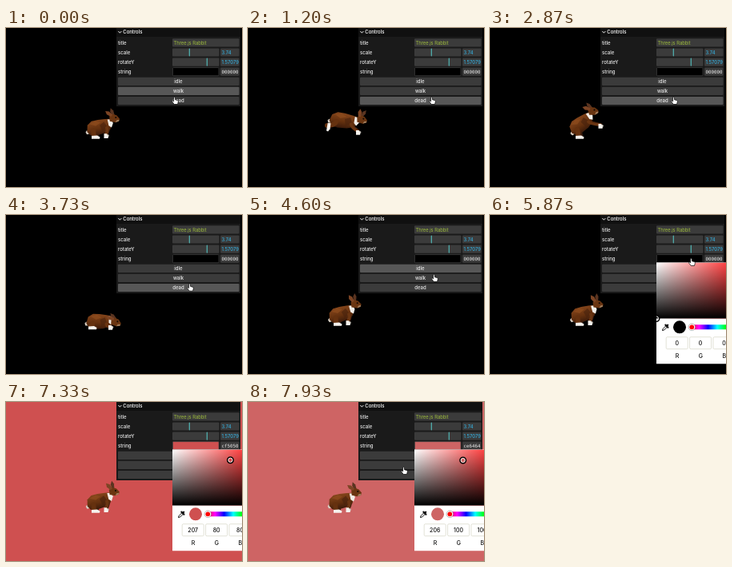
Recreate the animation shown at these times as an HTML page. Size 295 by 199 pixels, loop 8000 ms.

```html
<!DOCTYPE html>
<html lang="en">
<head>
<meta charset="utf-8">
<title>Rabbit controls</title>
<style>
  html, body { margin: 0; width: 100%; height: 100%; overflow: hidden; background: #000; }
  svg { display: block; width: 100%; height: 100%; }
  text { font: 500 6px Inter, "Liberation Sans", sans-serif; fill: #ebebeb; }
  .title { font-weight: 600; font-size: 5.9px; }
  .mid { text-anchor: middle; }
  .mono { font: 5.8px "DejaVu Sans Mono", monospace; }
  .string { fill: #9fbd3e; font-size: 5.8px; font-weight: 400; }
  .number { fill: #35addb; font-size: 5.8px; }
  .widget { fill: #3b3b3b; }
  .widget.hover { fill: #575757; }
  .picker text { fill: #111; font-size: 7px; text-anchor: middle; }
  .field { fill: #fff; stroke: #d6d6c6; stroke-width: .7; }
  .leg { fill: none; stroke-linecap: round; }
</style>
</head>
<body>
<svg viewBox="0 0 295 199" preserveAspectRatio="none">
  <defs>
    <linearGradient id="saturation"><stop stop-color="#fff"/><stop offset="1" stop-color="#f00"/></linearGradient>
    <linearGradient id="shade" x2="0" y2="1"><stop stop-opacity="0"/><stop offset="1"/></linearGradient>
    <linearGradient id="hue"></linearGradient>
    <linearGradient id="fur" x2="0" y2="1"><stop stop-color="#84451b"/><stop offset=".55" stop-color="#65310f"/><stop offset="1" stop-color="#3a1a0a"/></linearGradient>
    <clipPath id="numberClip"><rect x="268" width="23.2" height="60"/></clipPath>
    <clipPath id="pickerClip"><rect x="208" y="59.5" width="118" height="126.7"/></clipPath>
  </defs>

  <rect id="scene" width="295" height="199"/>

  <g id="rabbit">
    <path id="hindFar" class="leg" stroke="#3a1b0b" stroke-width="4"/>
    <path id="frontFar" class="leg" stroke="#3a1b0b" stroke-width="3"/>
    <ellipse id="pawFar" rx="2.3" ry="1.8" fill="#c9c4bc"/>
    <g id="body">
      <path d="M-15 1 L-17 3 L-16 6 L-13 6Z" fill="#d8cfc4"/>
      <path d="M-15 3 L-13 -5 L-7 -9 L1 -9 L10 -8 L16 -7 L18 -2 L14 6 L6 9 L-5 10 L-12 8Z" fill="url(#fur)"/>
      <path d="M-10 -6 L-2 -8 L4 -5 L-3 -2Z" fill="#935020" opacity=".6"/>
      <path d="M2 -2 L8 -5 L11 2 L4 6Z" fill="#4a230e" opacity=".65"/>
      <path d="M13 -7 L18 -6 L19 -1 L16 4 L13 1Z" fill="#f2eee8"/>
    </g>
    <path id="hind" class="leg" stroke="#65310f" stroke-width="6"/>
    <path id="hindFoot" d="M-5 -1.6 L2 -2 L5.5 0 L5 2.2 L-5 2.2Z" fill="#f5f2ed"/>
    <path id="front" class="leg" stroke="#6a3512" stroke-width="3.8"/>
    <path id="paw" d="M-2 -3 L1.6 -3 L3.4 1 L3 2.8 L-2 2.8Z" fill="#f5f2ed"/>
    <g id="head">
      <path id="earFar" d="M-1.4 0 L-2.2 -6 L0 -10 L2 -6 L1.4 0Z" fill="#5a3420"/>
      <path d="M-6 -2 L-2 -5 L3 -4 L7 0 L6.5 3 L2 5 L-5 4Z" fill="#6a3511"/>
      <path d="M3.5 2 L6.7 1.3 L6.3 3.2 L2 5Z" fill="#a07d5c"/>
      <circle cx="2.2" cy="-1.2" r="1" fill="#100906"/>
      <path id="ear" d="M-1.6 0 L-2.5 -6 L0 -10 L2.3 -6 L1.6 0Z" fill="#7c4424"/>
    </g>
  </g>

  <g id="panel">
    <rect x="138" width="155" height="98" fill="#1a1a1a"/>
    <rect x="138" width="155" height="11" fill="#101010"/>
    <path d="M140.4 4 l2 2.2 2-2.2" fill="none" stroke="#ebebeb" stroke-width="1"/>
    <text class="title" x="146.3" y="7.2">Controls</text>
  </g>

  <g class="picker" id="picker" clip-path="url(#pickerClip)">
    <rect x="208" y="59" width="118" height="128" fill="#fff"/>
    <rect x="208" y="59.5" width="118" height="70" fill="url(#saturation)"/>
    <rect x="208" y="59.5" width="118" height="70" fill="url(#shade)"/>
    <g id="ring" fill="none"><circle r="3.7" stroke="#000" stroke-width="1.6"/><circle r="2.6" stroke="#fff" stroke-width=".9"/></g>
    <path d="M215.5 144.5 l.6-2 4-4 1.5 1.5 -4 4Z" fill="none" stroke="#111" stroke-width="1"/>
    <path d="M219.4 137.6 l3 3 M220.9 139 l1.3-1.3" stroke="#111" stroke-width="2.2" stroke-linecap="round"/>
    <circle id="chip" cx="237" cy="140.3" r="8"/>
    <rect x="250" y="137.3" width="68" height="6" rx="3" fill="url(#hue)"/>
    <circle cx="252.3" cy="140.3" r="3.5" fill="#f00" stroke="#fff" stroke-width="1.2"/>
    <circle cx="252.3" cy="140.3" r="4.3" fill="none" stroke="#777" stroke-width=".5"/>
  </g>

  <path id="cursor" d="M-1.5 -4.3 q.9-.9 1.7 0 l.3 3 3 .9 q1 .5.8 1.8 l-.8 3.1h-4.2 l-2.7-3.4 q-.2-1.2 1-1 l1 .8Z" fill="#fff" stroke="#000" stroke-width=".7"/>
</svg>

<script>
const LOOP = 8000, STEP = 1000 / 15, ROW = 12.1, STRIDE = 800;
const el = id => document.getElementById(id);
const set = (id, name, value) => el(id).setAttribute(name, value);

function add(parent, tag, attrs, text = '') {
  const node = document.createElementNS('http://www.w3.org/2000/svg', tag);
  for (const name in attrs) node.setAttribute(name, attrs[name]);
  node.textContent = text;
  return el(parent).appendChild(node);
}

const rowTop = i => 13.3 + i * ROW;
const widget = (row, x, width, attrs) =>
  add('panel', 'rect', { class: 'widget', x, y: rowTop(row), width, height: 10.2, rx: 1, ...attrs });
const label = (row, x, text, attrs) => add('panel', 'text', { x, y: rowTop(row) + 7.2, ...attrs }, text);

['title', 'scale', 'rotateY', 'string'].forEach((name, i) => label(i, 140, name));
widget(0, 208, 83.5);
label(0, 209.5, 'Three.js Rabbit', { class: 'string' });
[['3.74', 229.3], ['1.57079', 251.3]].forEach(([value, x], i) => {
  widget(i + 1, 208, 58.5);
  widget(i + 1, 268, 23.5);
  widget(i + 1, x - .6, 1.2, { style: 'fill: #52b5b4' });
  label(i + 1, 269.5, value, { class: 'number', 'clip-path': 'url(#numberClip)' });
});
widget(3, 208.4, 57.7, { id: 'swatch', class: '', stroke: '#3f3f3f', 'stroke-width': .8 });
widget(3, 268, 23.5);
label(3, 269.5, '', { id: 'hex', class: 'mono' });
const buttons = ['idle', 'walk', 'dead'].map((name, i) => {
  const button = widget(i + 4, 140, 151.5);
  label(i + 4, 215.5, name, { class: 'mid' });
  return button;
});
const channels = [...'RGB'].map((name, i) => {
  const x = 233.7 + i * 29.4;
  add('picker', 'rect', { class: 'field', x: x - 13.5, y: 152.7, width: 27, height: 15, rx: 1.5 });
  add('picker', 'text', { x: x + .3, y: 178.6 }, name);
  return add('picker', 'text', { x, y: 162.7 });
});
for (let i = 0; i <= 6; i++) {
  add('hue', 'stop', { offset: i / 6, 'stop-color': `hsl(${360 - i * 60} 100% 50%)` });
}

function ramp(t, from, to) {
  const u = Math.min(1, Math.max(0, (t - from) / (to - from)));
  return u * u * (3 - 2 * u);
}

function mix(a, b, amount) {
  return Object.fromEntries(Object.keys(a).map(k => [k, a[k] + ((b[k] ?? a[k]) - a[k]) * amount]));
}

const sit = {
  x: 115.5, y: 124, lean: -16, stretch: 1,
  headX: 134.5, headY: 111.5, nod: 0, ears: -34,
  frontX: 124.5, frontY: 135.3, hindX: 112, hindY: 136.5, kick: 0,
};
const nibble = { lean: -12, headX: 135, headY: 113, nod: 4, ears: -58 };
const rear = { x: 113, y: 120.5, lean: -34, headX: 128.5, headY: 104, nod: -8, ears: -68, frontX: 137.5, frontY: 123 };
const dead = { y: 133, lean: 2, headX: 137, headY: 134, nod: 14, ears: -88, frontX: 130, frontY: 141, hindX: 108, hindY: 141 };

// One bound per stride, fully stretched at phase 0.
function gallop(t) {
  const phase = (t / STRIDE - 1.5) * 2 * Math.PI, c = Math.cos(phase), s = Math.sin(phase);
  return {
    x: 116.5 + 2 * c, y: 118.5 - 3 * c, lean: 10 * c + 8 * s, stretch: 1 + .1 * c,
    headX: 138 + 4 * c, headY: 112.5 + 2 * c + 3 * s, nod: 8 * c, ears: -24 + 22 * c,
    frontX: 131 + 6 * c, frontY: 133 - 2 * c + 4 * s, hindX: 110 - 9 * c + 6 * s, hindY: 131 - 7 * c, kick: 50 + 50 * c,
  };
}

function rabbitAt(t) {
  const droop = 1 - ramp(t, 0, 600) + ramp(t, 6900, 7850);
  const walk = ramp(t, 0, 250) - ramp(t, 2450, 2700);
  const rise = ramp(t, 2600, 2850);
  const fall = ramp(t, 2870, 3170) - ramp(t, 4270, 4470);
  let pose = mix(mix(sit, nibble, droop), gallop(t), walk);
  pose = mix(pose, rear, rise - ramp(t, 3200, 3500));
  return mix(pose, dead, fall);
}

function drawRabbit(p) {
  const a = p.lean * Math.PI / 180, cos = Math.cos(a), sin = Math.sin(a);
  const onBody = (x, y) => `${p.x + x * p.stretch * cos - y * sin} ${p.y + x * p.stretch * sin + y * cos}`;
  const limb = (id, x, bend, endX, endY) =>
    set(id, 'd', `M${onBody(x, 3)}Q${onBody(x + Math.sign(x), bend)} ${endX} ${endY - 2}`);
  const place = (id, x, y, angle) => set(id, 'transform', `translate(${x} ${y}) rotate(${angle})`);
  set('body', 'transform', `translate(${p.x} ${p.y}) rotate(${p.lean}) scale(${p.stretch} 1)`);
  limb('hind', -7, 8, p.hindX - 2, p.hindY);
  limb('hindFar', -4, 8, p.hindX + 2, p.hindY);
  limb('front', 10, 7, p.frontX, p.frontY);
  limb('frontFar', 12, 6, p.frontX + 1.5, p.frontY);
  place('hindFoot', p.hindX, p.hindY, p.kick);
  place('paw', p.frontX, p.frontY, 0);
  place('pawFar', p.frontX + 2, p.frontY - .5, 0);
  place('head', p.headX, p.headY, p.nod);
  place('ear', -3, -3, p.ears);
  place('earFar', -.8, -3.5, p.ears + 32);
}

function drawColor(t) {
  const pick = ramp(t, 6130, 6700), fade = ramp(t, 6800, 7650);
  const s = .8325 * pick - .3179 * fade, v = .8196 * pick - .0118 * fade;
  const rgb = [v, v * (1 - s), v * (1 - s)].map(c => Math.round(c * 255));
  const hex = rgb.map(c => c.toString(16).padStart(2, '0')).join('');
  for (const id of ['scene', 'swatch', 'chip']) set(id, 'fill', '#' + hex);
  el('hex').textContent = hex;
  channels.forEach((text, i) => { text.textContent = rgb[i]; });
  set('ring', 'transform', `translate(${208 + s * 118} ${59.5 + (1 - v) * 70})`);
}

// Each move: start, end, and the point the pointer glides to.
const moves = [
  [-150, 0, 211, 91], [0, 400, 230, 91], [3700, 4150, 231, 68],
  [4400, 4600, 233, 79], [4750, 5150, 252, 59], [7300, 7870, 195, 86],
];
const cursorAt = t => moves.reduce(([x, y], [from, to, toX, toY]) => {
  const u = ramp(t, from, to);
  return [x + (toX - x) * u, y + (toY - y) * u];
}, [208, 79]);

function draw(now) {
  const t = Math.floor(((now + 4) % LOOP) / STEP) * STEP;
  const pickerOpen = t >= 5330;
  drawRabbit(rabbitAt(t));
  drawColor(t);
  // Highlight trails the pointer slightly.
  const hover = Math.floor((cursorAt(t - 120)[1] - rowTop(4)) / ROW);
  buttons.forEach((button, i) => button.classList.toggle('hover', !pickerOpen && i === hover));
  set('picker', 'visibility', pickerOpen ? 'visible' : 'hidden');
  set('cursor', 'transform', `translate(${cursorAt(t)})`);
  set('cursor', 'visibility', t > 6100 && t < 7520 ? 'hidden' : 'visible');
}

let start;
function tick(now) {
  start ??= now;
  draw(now - start);
  requestAnimationFrame(tick);
}
draw(0);
requestAnimationFrame(tick);
</script>
</body>
</html>
```
